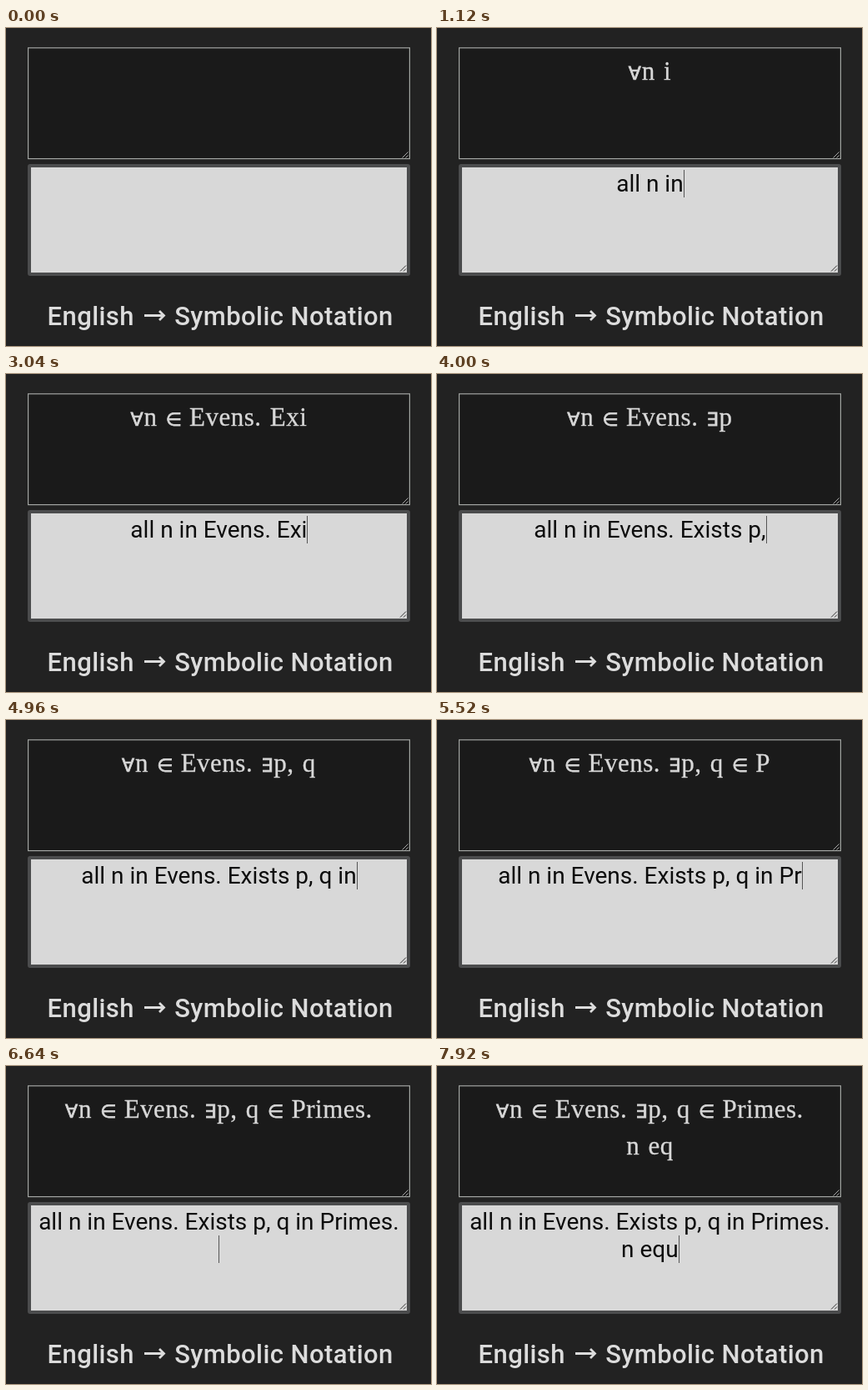
Write an HTML page with a canvas that moves like this. It is 510 px wide and 381 px high and loops after 8 s.

```html
<!DOCTYPE html>
<html lang="en">
<head>
<meta charset="utf-8">
<style>
  html, body { margin: 0; width: 100%; height: 100%; overflow: hidden; background: #222; }
  canvas { display: block; }
</style>
</head>
<body>
<canvas id="stage" width="510" height="381"></canvas>
<script>
const ctx = document.getElementById('stage').getContext('2d');
const LOOP = 8000, CENTER = 255.4, RENDER_LAG = 90;
const SANS = '28px Roboto, sans-serif';
const SERIF = '31px "Liberation Serif", serif';
const SYMBOL = '22px "DejaVu Sans", sans-serif';

// Each chunk: text, then the moment of every keystroke in ms.
const keys = [
  ['all ', 160, 320, 400, 480],
  ['n ', 640, 800],
  ['in ', 880, 1040, 1200],
  ['Evens. ', 1440, 1600, 1840, 2000, 2080, 2240, 2400],
  ['Exists ', 2560, 2720, 2880, 3120, 3280, 3440, 3600],
  ['p, ', 3760, 3920, 4160],
  ['q ', 4400, 4560],
  ['in ', 4880, 4960, 5120],
  ['Primes', 5280, 5440, 5600, 5680, 5840, 6000],
  ['.\n', 6160, 6400],
  ['n ', 6880, 7040],
  ['equ', 7200, 7760, 7920],
].flatMap(([text, ...times]) => [...text].map((char, i) => ({ char, time: times[i] })));

// The notation follows the typing with a short delay; the line's closing period shows at once.
const lagOf = key => key.time === 6160 ? 0 : RENDER_LAG;
const typedAt = (t, lag = () => 0) =>
  keys.filter(key => key.time + lag(key) <= t).map(key => key.char).join('');

const toNotation = text => text
  .replace(/\ball ?/g, '∀')
  .replace(/\bExists ?/g, '∃')
  .replace(/\bin\b/g, '∈');

function setFont(font, letter = 0, word = 0) {
  ctx.font = font;
  ctx.letterSpacing = letter + 'px';
  ctx.wordSpacing = word + 'px';
}

function resizeHandle(x, y, color) {
  ctx.strokeStyle = color;
  ctx.lineWidth = 1;
  ctx.beginPath();
  for (const size of [7, 3]) {
    ctx.moveTo(x - size, y);
    ctx.lineTo(x, y - size);
  }
  ctx.stroke();
}

function drawPanels() {
  ctx.fillStyle = '#222';
  ctx.fillRect(0, 0, 510, 381);

  ctx.fillStyle = '#1a1a1a';
  ctx.fillRect(26, 23, 459, 134);
  ctx.strokeStyle = '#a2a5a2';
  ctx.lineWidth = 1.2;
  ctx.strokeRect(26.6, 23.8, 457.8, 132.8);
  resizeHandle(482.5, 155.5, '#aaa');

  ctx.fillStyle = '#4b4c4d';
  ctx.beginPath();
  ctx.roundRect(26, 163, 459, 134, 3);
  ctx.fill();
  ctx.fillStyle = '#d8d8d8';
  ctx.fillRect(30, 167, 451, 126);
  resizeHandle(480, 291.5, '#333');
}

function drawTitle() {
  setFont('500 31px Roboto, sans-serif', 0.4);
  ctx.fillStyle = '#dcdcdc';
  ctx.fillText('English', 49.6, 356);
  ctx.fillText('Symbolic Notation', 202.2, 356);
  ctx.strokeStyle = '#dcdcdc';
  ctx.lineWidth = 2.8;
  ctx.beginPath();
  ctx.moveTo(166, 344.5);
  ctx.lineTo(189, 344.5);
  ctx.moveTo(184, 339);
  ctx.lineTo(189.5, 344.5);
  ctx.lineTo(184, 350);
  ctx.stroke();
}

function drawNotation(line, baseline) {
  const runs = line.trimEnd().split(/([∀∃∈])/).filter(Boolean);
  const isSymbol = run => /[∀∃∈]/.test(run);
  const useFont = run => isSymbol(run) ? setFont(SYMBOL, 1) : setFont(SERIF, 0.5, 2);
  const widths = runs.map(run => { useFont(run); return ctx.measureText(run).width; });
  let x = CENTER - widths.reduce((sum, w) => sum + w, 0) / 2;
  ctx.fillStyle = ctx.strokeStyle = '#d8d8d8';
  runs.forEach((run, i) => {
    useFont(run);
    ctx.fillText(run, x, baseline);
    ctx.lineWidth = isSymbol(run) ? 0.8 : 0.3;
    ctx.strokeText(run, x, baseline);
    x += widths[i];
  });
}

function drawInput(text) {
  setFont(SANS);
  ctx.fillStyle = '#0c0c0c';
  let caretX, row;
  text.split('\n').forEach((line, i) => {
    // Trailing spaces move the caret but not the centred text.
    const left = CENTER - ctx.measureText(line.trimEnd()).width / 2;
    ctx.fillText(line, left, 196 + 33 * i);
    caretX = left + ctx.measureText(line).width;
    row = i;
  });
  ctx.fillStyle = '#555';
  if (text) ctx.fillRect(Math.round(caretX), 170 + 33 * row, 1, 33);
}

function draw(now) {
  const t = now % LOOP;
  drawPanels();
  drawTitle();
  toNotation(typedAt(t, lagOf)).split('\n').forEach((line, i) => drawNotation(line, 62 + 43.5 * i));
  drawInput(typedAt(t));
  requestAnimationFrame(draw);
}
requestAnimationFrame(draw);
</script>
</body>
</html>
```
